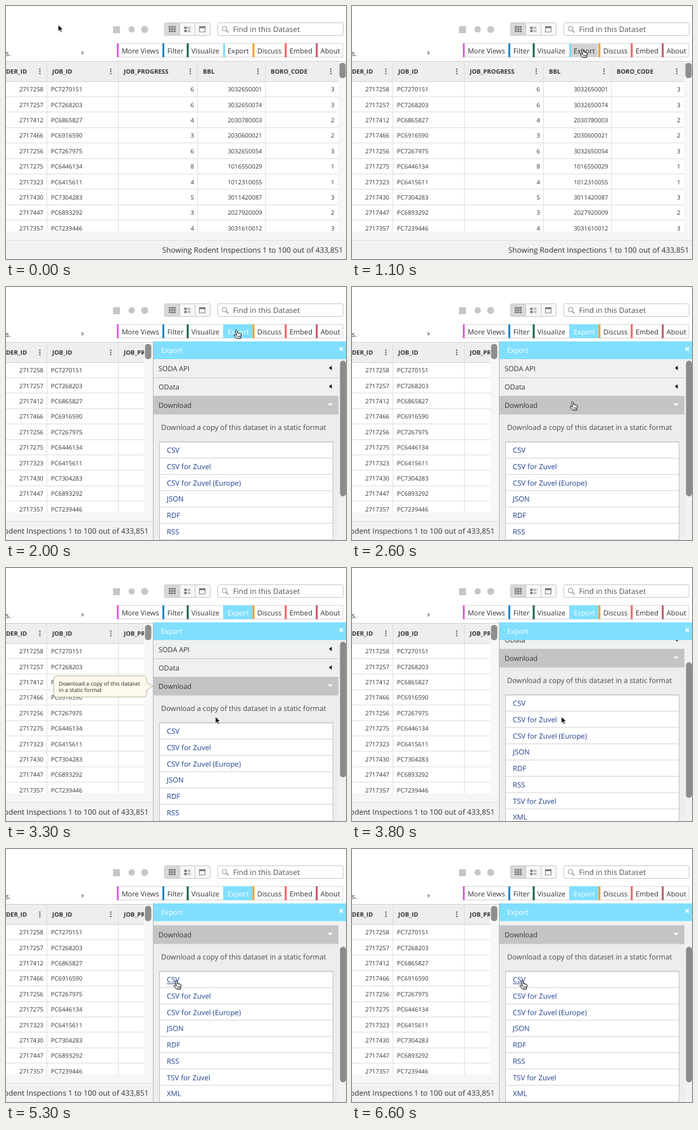
Recreate the animation shown at these times as an HTML page. Size 537x400 px, loop 6.7 s.

```html
<!DOCTYPE html>
<html lang="en">
<head>
<meta charset="utf-8">
<title>Exporting a dataset</title>
<style>
  html, body { margin: 0; width: 100%; height: 100%; overflow: hidden; background: #fff; }
  svg { display: block; width: 537px; height: 400px; }
  text { font: 11px "Open Sans", "Noto Sans", sans-serif; fill: #333; text-rendering: geometricPrecision; white-space: pre; }
  .head { font-size: 9.6px; font-weight: 700; }
  .cell { font-size: 9.5px; }
  .mid { font-size: 11.33px; }
  .big { font-size: 11.83px; }
  .tip { font-size: 8.65px; fill: #222; }
  .end { text-anchor: end; }
  .white { fill: #fff; }
  .link { fill: #1c3d8c; }
  .line { stroke: #dedede; fill: none; }

  .anim { animation: 6.7s linear infinite; }
  .step { animation-timing-function: step-end; }
  .slide { animation-name: slide; }
  .scroll { animation-name: scroll; }
  .thumb { animation-name: thumb; }
  .hover { animation-name: hover; }
  .active { animation-name: active; }
  .bubble { animation-name: bubble; }
  .under { animation-name: under; }
  .pointer { animation-name: move; }
  .arrow { animation-name: arrow; }
  .hand { animation-name: hand; }

  @keyframes slide {
    0%, 20.9% { transform: translateX(0); animation-timing-function: ease-in-out; }
    28.36%, 100% { transform: translateX(-307px); }
  }
  @keyframes scroll {
    0%, 52.24% { transform: translateY(0); }
    53.73% { transform: translateY(-12px); }
    56.72% { transform: translateY(-44.2px); }
    58.21% { transform: translateY(-49.5px); }
    59.7%, 100% { transform: translateY(-51.4px); }
  }
  @keyframes thumb {
    0%, 52.24% { transform: translateY(0); }
    53.73% { transform: translateY(9px); }
    56.72% { transform: translateY(32.5px); }
    58.21% { transform: translateY(36.5px); }
    59.7%, 100% { transform: translateY(38px); }
  }
  @keyframes hover { 0% { opacity: 0; } 10.4% { opacity: 1; } 22.35%, 100% { opacity: 0; } }
  @keyframes active { 0% { opacity: 0; } 22.35%, 100% { opacity: 1; } }
  @keyframes bubble {
    0%, 38.8% { opacity: 0; }
    40.3%, 49.5% { opacity: 1; }
    51.5%, 100% { opacity: 0; }
  }
  @keyframes under { 0% { opacity: 0; } 67.1%, 100% { opacity: 1; } }
  @keyframes move {
    0% { transform: translate(82.4px, 29.6px); animation-timing-function: ease-in-out; }
    10.45% { transform: translate(363px, 68px); }
    11.94%, 31.34% { transform: translate(364px, 67.8px); animation-timing-function: ease-in; }
    37.31% { transform: translate(350px, 178px); }
    43.28% { transform: translate(344px, 190px); animation-timing-function: ease-in-out; }
    48.5%, 59.7% { transform: translate(330.7px, 235px); animation-timing-function: ease-in; }
    62.69% { transform: translate(300px, 219px); animation-timing-function: ease-out; }
    65.6%, 66% { transform: translate(260px, 203px); }
    71.64%, 100% { transform: translate(269px, 208px); }
  }
  @keyframes arrow {
    0% { opacity: 1; }
    11.9% { opacity: 0; }
    44.78% { opacity: 1; }
    64.1%, 100% { opacity: 0; }
  }
  @keyframes hand {
    0% { opacity: 0; }
    11.9% { opacity: 1; }
    44.78% { opacity: 0; }
    64.1%, 100% { opacity: 1; }
  }
</style>
</head>
<body>
<svg viewBox="0 0 537 400">
  <defs>
    <clipPath id="view"><rect x="540" y="114" width="305" height="286"/></clipPath>
  </defs>
  <rect width="537" height="400" fill="#fff"/>

  <!-- toolbar -->
  <text x="-0.5" y="78.5">s.</text>
  <path d="M119.500 70.500l4 3.500-4 3.500z" fill="#999"/>
  <g fill="#c6c6c6">
    <rect x="169" y="32" width="11" height="11"/>
    <circle cx="198.5" cy="37" r="5"/>
    <circle cx="219" cy="37" r="5.5"/>
  </g>
  <g stroke="#c8c8c8">
    <rect x="250.5" y="26.5" width="72" height="20" rx="2" fill="#f7f7f7"/>
    <rect x="250.5" y="26.5" width="24" height="20" rx="2" fill="#d8d8d8"/>
    <path d="M298.5 27v20"/>
    <rect x="334.5" y="26.5" width="198" height="20" rx="2" fill="#fff"/>
  </g>
  <g fill="none" stroke="#777">
    <path d="M257 33h11M257 36.500h11M257 40h11" stroke-width="2.400" stroke-dasharray="3.200 .7"/>
    <path d="M281.500 34.500h4M281.500 39.500h4" stroke-width="3.500"/>
    <path d="M287 33.500h4.500M287 35.500h4.500M287 38.500h4.500M287 40.500h4.500" stroke-width=".8"/>
    <rect x="305.500" y="32.500" width="9" height="8.500" stroke-width=".9"/>
    <path d="M305 33.500h10" stroke-width="3"/>
    <g stroke="#999">
      <circle cx="345.200" cy="35.700" r="3.500" stroke-width="1.100"/>
      <path d="M347.800 38.300l3.400 3.600" stroke-width="1.700"/>
    </g>
  </g>
  <text class="big" x="358.500" y="41.300" style="fill:#555">Find in this Dataset</text>
  <path d="M176 59.200H532V80.700H176" fill="none" stroke="#d2d2d2"/>
  <g id="tabs"></g>
  <rect class="anim step hover" x="346" y="60" width="42.500" height="20.500" fill="#d2d2d2"/>
  <text x="350" y="74.500">Export</text>
  <g class="anim step active">
    <rect x="343" y="59" width="46" height="22" fill="#80dfff"/>
    <text class="white" x="350" y="74.500">Export</text>
  </g>

  <!-- table -->
  <rect y="87" width="537" height="32" fill="#eee"/>
  <path d="M0 87.500H537M0 119.500H525" stroke="#d0d0d0"/>
  <g id="table"></g>
  <rect y="356.500" width="537" height="14" fill="#f6f6f6"/>
  <rect y="370" width="537" height="30" fill="#f2f2f2"/>
  <path class="line" d="M0 370.500H537"/>

  <!-- everything that travels when the panel opens -->
  <g class="anim slide">
    <rect x="525" y="88" width="15" height="268.500" fill="#f7f7f7"/>
    <rect x="526.500" y="90" width="10" height="24" rx="4.500" fill="#8e8e8e"/>
    <text class="big end" x="532.300" y="389.500">Showing Rodent Inspections 1 to 100 out of 433,851</text>

    <rect x="539.500" y="86" width="306" height="314" fill="#ededed"/>
    <g clip-path="url(#view)">
      <g class="anim scroll">
        <rect x="540" y="114" width="292" height="58" fill="#eff0f0"/>
        <path d="M540 143.500h292M540 172.500h292" stroke="#c9c9c9"/>
        <rect x="540" y="172.500" width="292" height="29" fill="#c4c4c4"/>
        <text x="548" y="132.500">SODA API</text>
        <text x="548" y="161.700">OData</text>
        <text x="548" y="191">Download</text>
        <path d="M821.500 124.500v7l-4.500-3.500zM821.500 153.700v7l-4.500-3.500z" fill="#111"/>
        <path d="M815 184h8l-4 4z" fill="#fff"/>
        <text class="mid" x="552" y="226" style="fill:#484848">Download a copy of this dataset in a static format</text>
        <rect x="549.500" y="244.500" width="274" height="240" fill="#fff" stroke="#c2c2c2"/>
        <path d="M550 245.500h273" stroke="#dedede"/>
        <g id="formats"></g>
        <path class="anim step under" d="M561 264.300h20" stroke="#1c3d8c"/>
      </g>
      <rect x="832" y="114" width="13" height="286" fill="#f1f1f1"/>
      <rect class="anim thumb" x="834.500" y="116.500" width="9.500" height="214.500" rx="4.700" fill="#8b8b8b"/>
    </g>
    <rect x="540" y="86" width="305" height="28" fill="#80dfff"/>
    <path d="M539.500 86V400" stroke="#b9b9b9"/>
    <text class="white" x="552" y="104">Export</text>
    <path d="M834 95.500l5 5m0-5l-5 5" stroke="#fff" stroke-width="1.800"/>
  </g>

  <g class="anim bubble">
    <path d="M80 170.500H217q5 0 5 5V181l10 6-10 6v6q0 5-5 5H80q-4.500 0-4.500-5V175.500q0-5 4.500-5z" fill="#fdf9ec" stroke="#b9b19a"/>
    <text class="tip" x="83.500" y="186">Download a copy of this dataset</text>
    <text class="tip" x="83.500" y="195.500">in a static format</text>
  </g>

  <g class="anim pointer">
    <path class="anim step arrow" d="M0 0V10.500L2.500 8.200 4.300 12.200 6 11.400 4.300 7.500H7.600z" fill="#000" stroke="#fff" stroke-width=".8"/>
    <g class="anim step hand" stroke="#000" stroke-linejoin="round" stroke-linecap="round">
      <path d="M-1.500 1.200Q-1.300 .3-.5 .3 .6 .3 .9 1.400L1.900 5.200Q3 4.300 3.900 5.400 5 4.800 5.700 6 7 5.700 7.300 7L7.500 9.500 6.600 11.500V13.500H.4L-3.600 8.900Q-4.300 7.700-3.200 7.300-2.400 7.100-1.500 8.100L-.2 8.500z" fill="#fff"/>
      <path d="M2 9.500v2M4 9.500v2M5.700 9.500v1.500" stroke-width=".8" fill="none"/>
    </g>
  </g>
</svg>
<script>
  const fill = (id, parts) => document.getElementById(id).innerHTML = parts.join("");
  const label = (x, y, text, cls = "") => `<text class="${cls}" x="${x}" y="${y}">${text}</text>`;

  const tabs = [
    ["More Views", 175, "#dc66d4", 182.7], ["Filter", 247, "#2486c4", 254.7],
    ["Visualize", 285.5, "#15643f", 292.7], ["", 343, "#7fdcfa", 350],
    ["Discuss", 389.3, "#f09a36", 396.8], ["Embed", 440.3, "#f4605f", 448],
    ["About", 489.3, "#c0576a", 496.8]
  ];
  fill("tabs", tabs.map(([name, bar, color, x]) =>
    `<rect x="${bar}" y="59" width="3" height="22" fill="${color}"/>` + label(x, 74.5, name)));

  const heads = [["DER_ID", 0, 53.5], ["JOB_ID", 73, 165.5], ["JOB_PROGRESS", 186, 291],
    ["BBL", 311, 398], ["BORO_CODE", 418, 513]];
  const rows = `2717258 PC7270151 6 3032650001 3
    2717257 PC7268203 6 3032650074 3
    2717412 PC6865827 4 2030780003 2
    2717466 PC6916590 3 2030600021 2
    2717256 PC7267975 6 3032650054 3
    2717275 PC6446134 8 1016550029 1
    2717323 PC6415611 4 1012310055 1
    2717430 PC7304283 5 3011420087 3
    2717447 PC6893292 3 2027920009 2
    2717357 PC7239446 4 3031610012 3`.split("\n").map(row => row.trim().split(" "));
  const edges = [59, 71, 297, 404.5, 518.7];
  const pitch = 24.4;

  fill("table", [
    ...heads.map(([name, x, dots]) => label(x, 107, name, "head") +
      [99.8, 103.3, 106.8].map(y => `<circle cx="${dots}" cy="${y}" r="1.1" fill="#444"/>`).join("")),
    ...rows.map((row, r) =>
      `<path class="line" d="M0 ${Math.round(119.5 + pitch * (r + 1)) - .5}H525"/>` +
      row.map((value, c) => label(edges[c], 135.2 + pitch * r, value, c == 1 ? "cell" : "cell end")).join("")),
    ...[64.7, 177.5, 302.5, 409.8, 525.2].map(x => `<path class="line" d="M${x} 88V357"/>`)
  ]);

  const formats = ["CSV", "CSV for Zuvel", "CSV for Zuvel (Europe)", "JSON", "RDF", "RSS", "TSV for Zuvel", "XML"];
  fill("formats", formats.map((name, i) => label(561, 262 + 25.75 * i, name, "mid link") +
    `<path d="M550 ${270.5 + 25.75 * i}h273" stroke="#d0d0d0"/>`));
</script>
</body>
</html>
```
